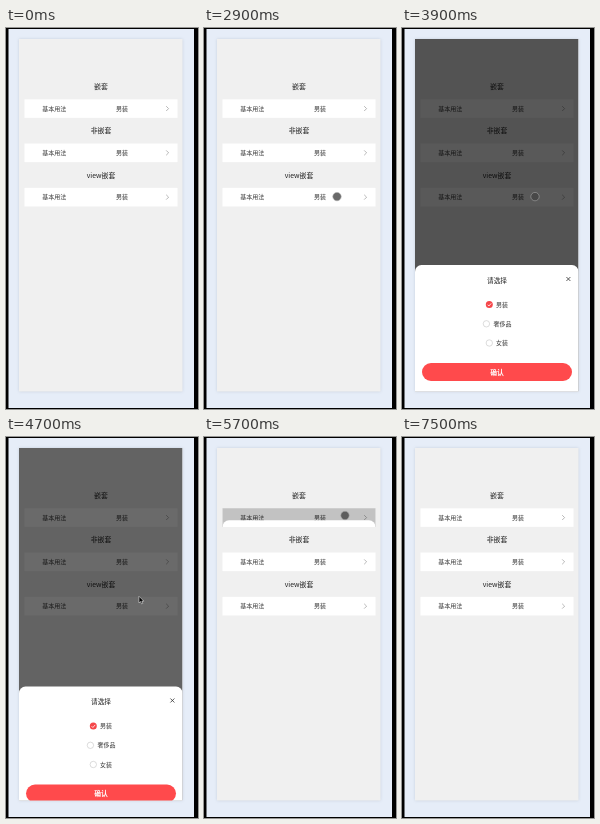
Recreate the animation shown at these times as an HTML page. Size 192 px wide and 381 px high, loop 8500 ms.

```html
<!DOCTYPE html>
<html lang="zh-CN">
<head>
<meta charset="utf-8">
<title>嵌套弹窗</title>
<style>
  html, body { margin: 0; width: 100%; height: 100%; overflow: hidden; background: #000; }
  svg { display: block; width: 192px; height: 381px; }
  text { font: 6px "Noto Sans CJK SC", "Noto Sans CJK", sans-serif; fill: #333; }
  .head { font-size: 6.9px; fill: #222; text-anchor: middle; }
  .title { font-size: 6.7px; font-weight: 500; fill: #222; text-anchor: middle; }
  .ok { font-size: 6.8px; font-weight: 700; fill: #fff; text-anchor: middle; }
  .line { fill: none; stroke: #999; stroke-width: .7; }
  .cross { fill: none; stroke: #333; stroke-width: .8; }
  .ring { fill: #fff; stroke: #c4c4c4; stroke-width: .6; }
  .tick { fill: none; stroke: #fff; stroke-width: .8; }
</style>
</head>
<body>
<svg viewBox="0 0 192 381">
  <defs>
    <clipPath id="phoneClip"><rect x="13" y="11" width="163.5" height="352.5"/></clipPath>
    <clipPath id="rowClip"><rect x="18.5" y="71.3" width="153" height="18.6"/></clipPath>
    <filter id="soft" x="-10%" y="-10%" width="120%" height="120%"><feGaussianBlur stdDeviation="1.5"/></filter>
    <g id="row">
      <rect x="18.5" y="-9.3" width="153" height="18.6" fill="#fff"/>
      <text x="36.3" y="2.2">基本用法</text>
      <text x="110" y="2.2">男装</text>
      <path class="line" d="M160.2 -2.4L162.6 0L160.2 2.4"/>
    </g>
    <path id="cross" class="cross" d="M-2 -2L2 2M2 -2L-2 2"/>
  </defs>
  <rect width="192" height="381"/>
  <rect x="2.5" y="1" width="185.5" height="379" fill="#e6edf8"/>
  <rect x="13" y="11" width="163.5" height="352.5" fill="#8d99ab" opacity=".35" filter="url(#soft)"/>
  <rect x="13" y="11" width="163.5" height="352.5" fill="#f0f0f0"/>

  <text class="head" x="95" y="61.2">嵌套</text>
  <text class="head" x="95" y="105.3">非嵌套</text>
  <text class="head" x="95" y="149.8">view嵌套</text>
  <use href="#row" y="80.6"/>
  <use href="#row" y="124.8"/>
  <use href="#row" y="169.2"/>

  <g clip-path="url(#rowClip)">
    <rect id="rowShade" x="18" y="71" width="154" height="20"/>
    <g id="rowSheet">
      <rect x="18.5" y="71.3" width="153" height="40" rx="6.5" fill="#fff"/>
      <text class="title" x="95" y="88.6">请选择</text>
      <use href="#cross" x="161.5" y="85.3"/>
    </g>
  </g>

  <g clip-path="url(#phoneClip)">
    <rect id="shade" x="13" y="11" width="163.5" height="352.5"/>
    <g id="sheet">
      <rect x="13" y="237" width="163.5" height="140" rx="6.5" fill="#fff"/>
      <text class="title" x="95" y="254.6">请选择</text>
      <use href="#cross" x="166.4" y="251"/>
      <circle cx="87.3" cy="276.6" r="3.5" fill="#f5474a"/>
      <path class="tick" d="M85.6 276.7L86.9 278L89.2 275.4"/>
      <text x="94" y="278.8">男装</text>
      <circle class="ring" cx="84.4" cy="295.8" r="3.2"/>
      <text x="91.4" y="298">奢侈品</text>
      <circle class="ring" cx="87.3" cy="315" r="3.2"/>
      <text x="94" y="317.2">女装</text>
      <rect x="20" y="335" width="150" height="18" rx="9" fill="#ff4a4c"/>
      <text class="ok" x="95" y="346.6">确认</text>
    </g>
  </g>

  <g id="pointer">
    <path id="arrow" d="M0 0V6.6L1.6 5.2L2.7 7.6L3.8 7.1L2.8 4.8H4.8Z" fill="#000" stroke="#fff" stroke-width=".5"/>
    <circle id="touch" r="4.2" fill="#444" fill-opacity=".8" stroke="#aaa" stroke-opacity=".7" stroke-width=".8"/>
  </g>
</svg>
<script>
  const LOOP = 8500, STEP = 100, DARK = .65;
  const el = id => document.getElementById(id);
  const clamp = v => Math.max(0, Math.min(1, v));

  // Pointer stops: time, x, y
  const path = [
    [900, 82, 165], [1100, 124.5, 190], [1300, 111, 207],
    [1800, 111, 207], [1900, 118, 204.5], [2500, 133, 168.6],
    [4100, 133, 168.6], [4500, 133, 159.3], [4900, 133, 159.3],
    [5200, 126, 120], [5500, 141, 78.5], [6000, 141, 78.5], [6600, 160.5, 83.3]
  ];
  const touches = [[2900, 4100], [5500, 6100], [6800, 7000]];

  function place(t) {
    let i = path.findIndex(p => p[0] > t);
    if (i < 0) return path[path.length - 1].slice(1);
    if (i === 0) return path[0].slice(1);
    const a = path[i - 1], b = path[i], u = (t - a[0]) / (b[0] - a[0]);
    return [a[1] + (b[1] - a[1]) * u, a[2] + (b[2] - a[2]) * u];
  }

  // Ease-out while opening, ease-in while closing
  function openness(t, start, close, closeTime) {
    const rise = 1 - Math.pow(1 - clamp((t - start) / 300), 2.75);
    return rise * (1 - Math.pow(clamp((t - close) / closeTime), 2));
  }

  function popup(name, shade, height, p) {
    el(name).setAttribute("transform", `translate(0 ${height * (1 - p)})`);
    el(name).style.visibility = p > 0 ? "visible" : "hidden";
    el(shade).setAttribute("opacity", DARK * p);
  }

  function draw(now) {
    const t = Math.floor((now % LOOP) / STEP) * STEP;
    popup("sheet", "shade", 126.5, openness(t, 3125, 4612, 280));
    popup("rowSheet", "rowShade", 19, openness(t, 5654, 7170, 300));

    const [x, y] = place(t);
    const down = touches.some(([a, b]) => t >= a && t < b);
    el("pointer").setAttribute("transform", `translate(${x} ${y})`);
    el("pointer").style.display = t >= 900 && t < 7500 ? "" : "none";
    el("arrow").style.display = down ? "none" : "";
    el("touch").style.display = down ? "" : "none";
  }

  const begin = performance.now();
  function tick() {
    draw(performance.now() - begin);
    requestAnimationFrame(tick);
  }
  tick();
</script>
</body>
</html>
```
